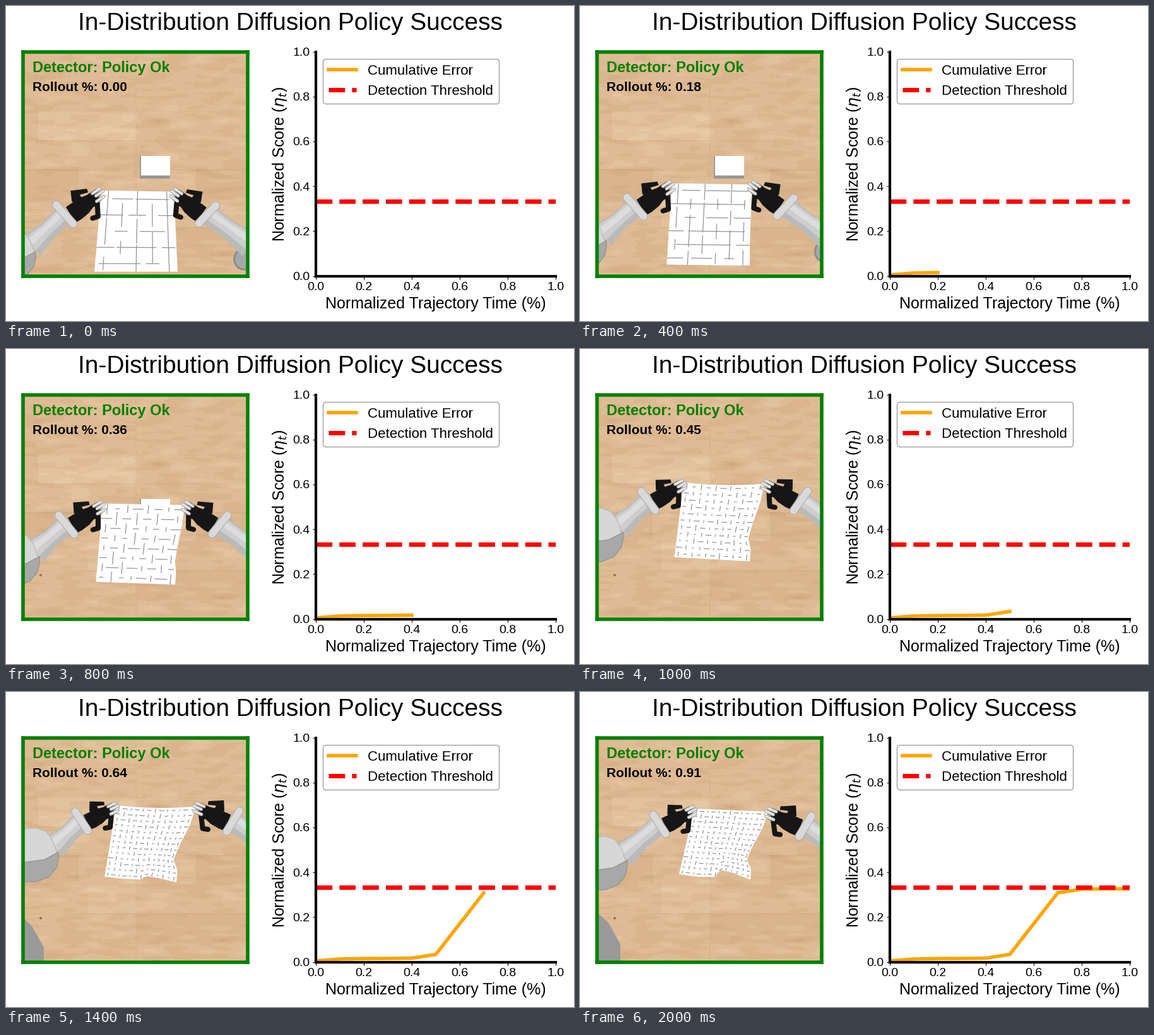
These frames come from a looping animation (900x500 px, 4.2 s). A matplotlib script:

```python
import numpy as np
import matplotlib.pyplot as plt
from matplotlib.animation import FuncAnimation
from matplotlib.collections import LineCollection
from matplotlib.patches import Circle, Polygon, Rectangle

W, H, DPI = 900, 500, 100
PX = 72 / DPI                     # points per pixel
FRAMES, INTERVAL, LAST = 21, 200, 10
L, R, T, B = 27, 383, 73, 429     # camera view in stage pixels
THRESHOLD = 1 / 3

plt.rcParams["font.family"] = "Liberation Sans"

# Shapes are complex numbers x + yj in pixels.
# Hand parts are relative to the wrist, for a hand reaching up and right.
REACH = 62 - 39j
PALM = np.array([2-12j, 14-20j, 30-29j, 46-35j, 57-29j, 52-18j, 40-2j, 28+8j, 18+14j])
THUMB = np.array([10-39j, 37-42j, 39-36j, 25-32j, 31-24j, 22-15j, 12-21j])
FINGER = np.array([41-14j, 54-18j, 55+4j, 46+7j])
TIPS = np.array([58-42j, 64-38j, 65-29j])
CUFF = np.array([-14-16j, 0j, 14+16j])
ELBOW = np.array([-40-42j, 0-44j, 15-39j, 26-24j, 35+3j, 32+18j, 20+33j, 0+41j, -40+41j])
ELBOW_SHADE = np.r_[-40+13j, 12+6j, 35-6j, ELBOW[4:]]
BASE = np.array([20+343j, 45+366j, 64+400j, 64+435j, 20+435j])

# Planks that stand out from the floor: left, right, row, tone.
PLANKS = [(50, 207, 2, .6), (27, 115, 4, -.5), (300, 383, 4, -.5),
          (128, 207, 5, .4), (207, 383, 6, -.5)]
WOOD = np.array([[203, 162, 120], [213, 175, 134], [222, 187, 148], [230, 200, 165]]) / 255


def logistic(x):
    return 1 / (1 + np.exp(-x))


def error(k):
    """Small start-up error, then a steep climb around step 6."""
    return .016 - .011 * np.exp(-1.4 * k) + .31 * logistic(2.8 * (k - 6))


def wood(n=178):
    """Rows of planks with horizontally stretched grain in a few flat tones."""
    rng = np.random.default_rng(3)
    fy, fx = np.meshgrid(np.fft.fftfreq(n), np.fft.fftfreq(n), indexing="ij")
    blur = np.exp(-(fx * 26) ** 2 - (fy * 6) ** 2)
    grain = np.fft.ifft2(np.fft.fft2(rng.normal(size=(n, n))) * blur).real
    xs = L + (np.arange(n) + .5) * (R - L) / n
    ys = T + (np.arange(n) + .5) * (B - T) / n
    rows = np.floor((ys - 76) / 46).astype(int)
    tone = 1.9 + .27 * grain / grain.std()
    for x0, x1, row, shift in PLANKS:
        tone[np.ix_(rows == row, (xs > x0) & (xs < x1))] += shift
    tone[:, np.abs(xs - 207).argmin()] -= .4
    tone[np.flatnonzero(np.diff(rows)) + 1] -= .35
    tone = np.clip(np.round(tone * 2) / 2, 0, 3)
    return np.stack([np.interp(tone, range(4), WOOD[:, c]) for c in range(3)], -1)


def grey(v):
    return (v / 255,) * 3


fig = plt.figure(figsize=(W / DPI, H / DPI), dpi=DPI, facecolor="white")
fig.text(.5, 1 - 38 / H, "In-Distribution Diffusion Policy Success",
         fontsize=28, ha="center", va="baseline")

# Camera view
cam = fig.add_axes([L / W, 1 - B / H, (R - L) / W, (B - T) / H])
cam.imshow(wood(), extent=(L, R, B, T), interpolation="nearest", aspect="auto")
cam.set(xlim=(L, R), ylim=(B, T), xticks=[], yticks=[])
cam.autoscale(False)
for spine in cam.spines.values():
    spine.set(color="green", linewidth=4, zorder=9)
cam.add_patch(Circle((55, 359), 2, color="#9c7148", lw=0))
cam.add_patch(Rectangle((212, 238), 48, 36, color=grey(152), lw=0))
cam.add_patch(Rectangle((214, 238), 46, 31, color="white", lw=0))
cam.text(42, 105, "Detector: Policy Ok", fontsize=17, weight="bold",
         color="green", zorder=10)
rollout = cam.text(42, 135, "", fontsize=15, weight="bold", zorder=10)

# Score plot
plot = fig.add_axes([491 / W, 1 - 428.57 / H, 380 / W, 356 / H])
score, = plot.plot([], [], color="orange", lw=4, label="Cumulative Error")
plot.plot([0, 1], [THRESHOLD] * 2, "--", color="red", lw=5, label="Detection Threshold")
plot.set(xlim=(0, 1), ylim=(0, 1))
plot.tick_params(labelsize=14)
plot.set_xlabel("Normalized Trajectory Time (%)", fontsize=18)
plot.set_ylabel(r"Normalized Score ($\eta_t$)", fontsize=18)
for side in ("top", "right"):
    plot.spines[side].set_visible(False)
for side in ("left", "bottom"):
    plot.spines[side].set_linewidth(3)
plot.legend(loc="upper left", fontsize=16, edgecolor="0.62", framealpha=1)

drawn = []


def fill(z, color, edge=None):
    z = np.asarray(z)
    drawn.append(cam.add_patch(Polygon(
        np.c_[z.real, z.imag], facecolor=color, edgecolor=edge or "none",
        lw=PX if edge else 0, zorder=3)))


def stroke(z, color, width):
    drawn.extend(cam.plot(z.real, z.imag, color=color, lw=width * PX, zorder=3,
                          solid_capstyle="round", solid_joinstyle="round"))


def draw_cloth(step, pull, rise, tl, tr):
    bl = 140+422j + pull * (-5-11j) + rise * (22-122j)
    br = 272+422j + pull * (-5-9j) + rise * (3-115j)
    sag = 9 * np.exp(-(step - 6) ** 2)
    fold = np.clip((step - 6) / 2, 0, 1)

    def place(u, v):
        z = (1 - v) * ((1 - u) * tl + u * tr) + v * ((1 - u) * bl + u * br)
        side = np.interp(v, [0, .25, .5, .7, .85, 1], [0, 2, 10, 14, 3, 0])
        hem = np.interp(u, [0, .25, .5, .58, .75, 1], [0, 2, 0, -12, -9, 0])
        drop = sag * 4 * u * (1 - u) * (1 - v)
        return z - rise * side * u ** 3 + 1j * (drop + fold * hem * v ** 4)

    t = np.linspace(0, 1, 40)
    one, zero = np.ones(40), np.zeros(40)
    fill(np.r_[place(t, zero), place(one, t), place(t[::-1], one),
               place(zero, t[::-1])], "white")

    # The mesh shows as broken lines that shorten as the cloth lifts.
    rng = np.random.default_rng(5)
    n = round(5 + pull + 7 * rise)
    dash = .62 + 1.2 * (1 - rise) ** 3
    lines = []
    for i in range(n):
        for j in range(n):
            half = dash * rng.uniform(.4, 1.4) / n / 2
            u, v = (i + .5) / n, (j + .5) / n
            du, dv = (half, 0) if (i + j) % 2 else (0, half)
            ends = place(np.clip([u - du, u + du], 0, 1),
                         np.clip([v - dv, v + dv], 0, 1))
            lines.append([(p.real, p.imag) for p in ends])
    drawn.append(cam.add_collection(
        LineCollection(lines, colors=[grey(150)], linewidths=1.3 * PX, zorder=3),
        autolim=False))


def draw_forearm(wrist, end, up):
    across = (end - wrist) / abs(end - wrist) * 1j * up
    spots = [(wrist, 16), ((wrist + end) / 2, 15), (end, 21)]
    for top, bottom, tone in ((1, -1, 186), (.85, -.45, 206), (.6, .05, 221)):
        fill([p + across * w * top for p, w in spots]
             + [p + across * w * bottom for p, w in spots[::-1]], grey(tone))


def draw_hand(wrist, tip, mirror):
    def place(z):
        z, reach = (-np.conj(z), -np.conj(REACH)) if mirror else (z, REACH)
        return wrist + z * (tip - wrist) / reach

    black = grey(22)
    fill(place(PALM), black)
    fill(place(THUMB), black)
    stroke(place(FINGER), black, 8)
    for end in TIPS:
        line = end + np.array([-12+8j, 0])
        stroke(place(line - 6+4j), black, 6)
        stroke(place(line), grey(165), 5.5)
        stroke(place(line), grey(228), 3.5)
    stroke(place(CUFF), grey(178), 13.5)
    stroke(place(CUFF), grey(217), 11)


def draw(frame):
    step = min(frame, LAST)
    while drawn:
        drawn.pop().remove()

    # Spread the cloth, lift it away, then lower it slightly.
    pull = min(step / 3, 1)
    rise = logistic((step - 4.5) / .75)
    settle = max(step - 8, 0) / 2

    def move(start, by_pull, by_rise, by_settle=0):
        return start + pull * by_pull + rise * by_rise + settle * by_settle

    tip_l = move(152+293j, -10-12j, 35-105j, 5+9j)
    tip_r = move(264+293j, 8-12j, 28-105j, -4+12j)
    wrist_l = tip_l - 59+38j + rise * (3-13j)
    wrist_r = tip_r + 55+38j + rise * (6-13j)
    elbow_l = move(12+396j, -10-20j, 48-120j, -10+17j)
    elbow_r = move(378+402j, 13-14j, 60-80j)
    arm_r = move(387+380j, 8-13j, 16-129j, -3+12j)

    draw_cloth(step, pull, rise, tip_l - 1, tip_r + 2+2j)
    fill(BASE + (1 - rise ** 2) * (-60+80j), grey(154))
    draw_forearm(wrist_l, elbow_l + 28-14j, 1)
    fill(ELBOW + elbow_l, grey(214), grey(180))
    fill(ELBOW_SHADE + elbow_l, grey(168), grey(140))
    draw_hand(wrist_l, tip_l, False)

    for r, tone in ((18, 140), (15, 168)):
        drawn.append(cam.add_patch(Circle((elbow_r.real, elbow_r.imag), r,
                                          color=grey(tone), lw=0, zorder=3)))
    draw_forearm(wrist_r, arm_r, -1)
    draw_hand(wrist_r, tip_r, True)

    rollout.set_text(f"Rollout %: {step / (LAST + 1):.2f}")
    k = np.arange(step + 1)
    score.set_data(k / LAST, error(k))
    # A single point leaves no mark.
    score.set_visible(step > 0)


anim = FuncAnimation(fig, draw, frames=FRAMES, interval=INTERVAL,
                     init_func=lambda: draw(0), repeat=True, repeat_delay=0)
plt.show()
```
